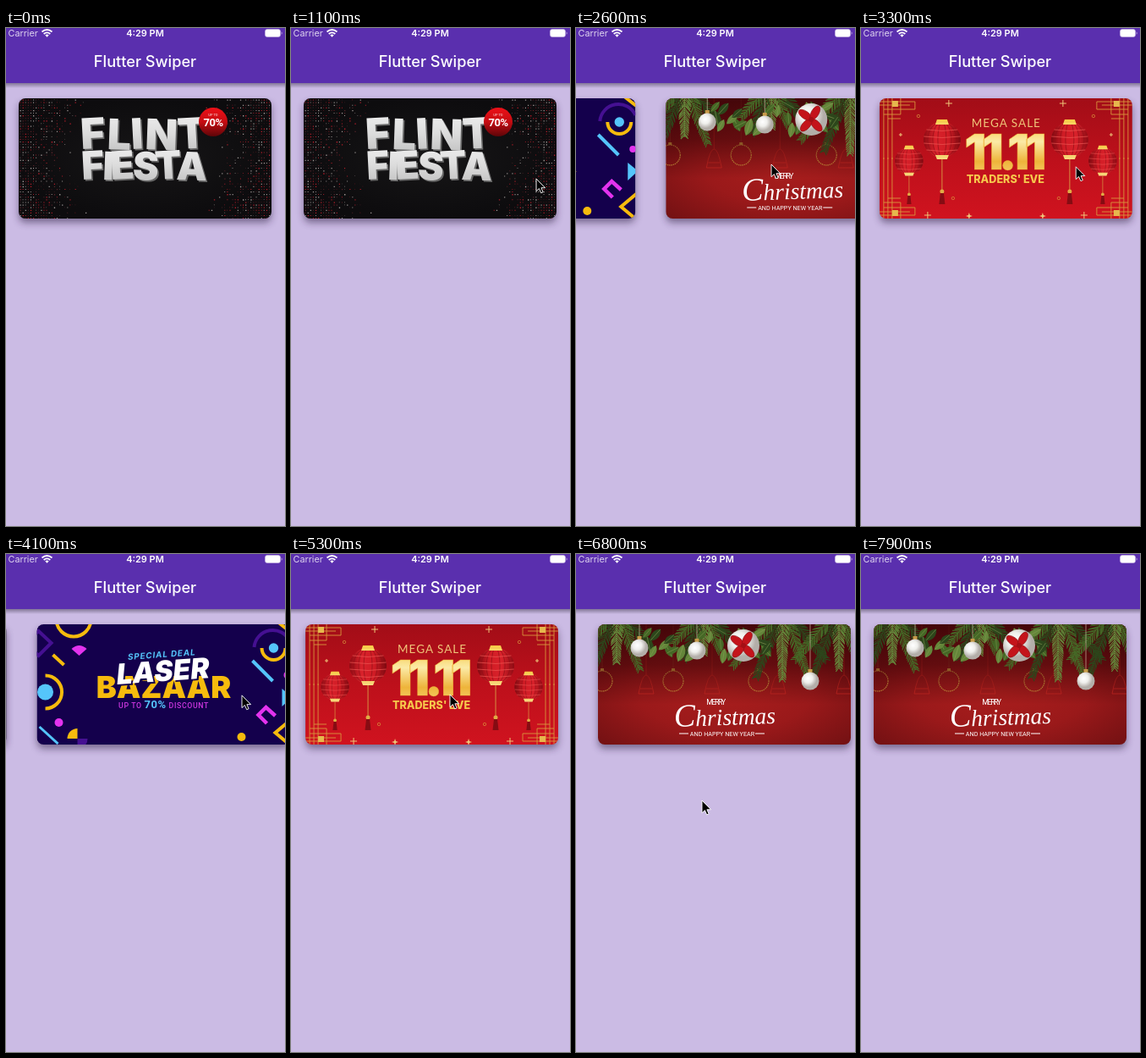
Write an HTML page that moves like this. It is 330x588 px and loops after 8000 ms.

```html
<!DOCTYPE html>
<html lang="en">
<head>
<meta charset="utf-8">
<title>Flutter Swiper</title>
<style>
html, body { margin: 0; width: 100%; height: 100%; overflow: hidden; background: #cbbbe4; }
svg { display: block; width: 100%; height: 100%; font-family: Inter, "Open Sans", sans-serif; }
.mid { text-anchor: middle; }
.line { fill: none; }
.narrow { font-family: Roboto, sans-serif; }
</style>
</head>
<body>
<svg id="stage" viewBox="0 0 330 588" preserveAspectRatio="none"></svg>
<script>
const LOOP = 8000, STEP = 100;
const REST = 15, STRIDE = 335, TOP = 83, W = 299, H = 142;

const swipes = [1185, 2402, 2853, 3305, 3758, 4252, 4746, 5310, 5860, 6396];

// Every swipe pulls the pointer left, then it goes back for the next one.
const dragEnds = swipes.map(t => [t + 150, 215, 159]);
const returns = swipes.slice(0, -1).map(t => [t + 345, 280, 167]);
const stops = [[1000, 322, 186], [1800, 246, 164], [5300, 188, 166], [6800, 149, 291], [7000, 140, 450]];
const pointerPath = [...dragEnds, ...returns, ...stops].sort((a, b) => a[0] - b[0]);

let seed = 7;
const random = () => (seed = seed * 16807 % 2147483647) / 2147483647;
const clamp = v => Math.max(0, Math.min(1, v));
const repeat = (n, make) => Array.from({ length: n }, (_, i) => make(i)).join('');
const circle = (x, y, r, attrs) => `<circle cx="${x}" cy="${y}" r="${r}" ${attrs}/>`;
const path = (d, attrs) => `<path d="${d}" ${attrs}/>`;
const line = (d, color, width) => path(d, `class="line" stroke="${color}" stroke-width="${width}"`);
const backdrop = fill => `<rect width="${W}" height="${H}" fill="${fill}"/>`;
const mirrorX = art => art + `<g transform="translate(${W} 0) scale(-1 1)">${art}</g>`;
const mirrorY = art => art + `<g transform="translate(0 ${H}) scale(1 -1)">${art}</g>`;
const colorStops = colors => colors.map((c, i) => `<stop offset="${i / (colors.length - 1)}" stop-color="${c}"/>`).join('');
const linear = (id, colors, end = 'x2="0" y2="1"') => `<linearGradient id="${id}" ${end}>${colorStops(colors)}</linearGradient>`;
const radial = (id, colors, attrs = '') => `<radialGradient id="${id}" ${attrs}>${colorStops(colors)}</radialGradient>`;

const defs = `<defs>
  <clipPath id="card"><rect width="${W}" height="${H}" rx="8"/></clipPath>
  <filter id="soft" x="-10%" y="-20%" width="120%" height="140%"><feGaussianBlur stdDeviation="4"/></filter>
  ${linear('barShadow', ['#4a425a90', '#4a425a00'])}
  ${linear('stone', ['#f3f3f3', '#dcdcdc', '#b9b9b9'])}
  ${linear('badge', ['#ed1018', '#c50c12', '#5d0508'])}
  ${linear('gold', ['#f6c840', '#fbeaa6', '#eeb43a', '#f8dc82'])}
  ${linear('festive', ['#a20d17', '#bd101b', '#d0131f'])}
  ${linear('lantern', ['#8d0b13', '#d9222b', '#d01c25', '#7d0910'], '')}
  ${linear('shade', ['#2a0004b0', '#2a000480', '#2a000400', '#2a000400'])}
  ${radial('velvet', ['#aa1e1d', '#9a191a', '#6f1012'], 'cy=".55" r=".7"')}
  ${radial('night', ['#171617', '#0d0c0e'])}
  ${radial('pearl', ['#ffffff', '#efefec', '#b3aea9'], 'cx=".38" cy=".35"')}
</defs>`;

function halftone() {
  const colors = ['#9a9391', '#b01c28', '#522328'], dots = ['', '', ''];
  for (let y = 1.5; y < H; y += 3.1) {
    for (let x = 1.5; x < W; x += 3.1) {
      const side = Math.abs(x - 150) / 150, edge = Math.abs(y - 71) / 71;
      if (random() > clamp((side + edge * .16 - .6) * 2.2)) continue;
      const size = (.5 + random() * .9).toFixed(1);
      dots[Math.floor(random() * 3)] += `M${x.toFixed(1)} ${y.toFixed(1)}h${size}v${size}h-${size}z`;
    }
  }
  return dots.map((d, i) => path(d, `fill="${colors[i]}"`)).join('');
}

function blockWord(word, x, y, size, spacing) {
  const turns = [...word].map((_, i) => i % 2 ? 2 : -3).join(' ');
  const text = (shift, fill) => `<text x="${x + shift}" y="${y + shift}" rotate="${turns}" fill="${fill}">${word}</text>`;
  return `<g font-size="${size}" font-weight="900" letter-spacing="${spacing}">${text(1.7, '#686868')}${text(0, 'url(#stone)')}</g>`;
}

function stoneCard() {
  return backdrop('url(#night)') + halftone()
    + blockWord('FLINT', 74, 60, 50, 1)
    + blockWord('FIESTA', 75, 96, 46, -3)
    + circle(230, 28, 17, 'fill="url(#badge)"')
    + `<g class="mid narrow" fill="#fff" font-weight="700">
      <text x="230" y="21" font-size="4" fill="#f0a9a9">UP TO</text>
      <text x="230" y="33" font-size="13" letter-spacing="-.5">70%</text></g>`;
}

function neonCard() {
  const navy = '#14004c', cyan = '#55c5fb', yellow = '#f6bb0d', pink = '#e333ee', violet = '#451092';
  const shapes = [
    line('M2 8L17 22 2 37-13 22Z', violet, 4),
    line('M23 -6A20.5 20.5 0 0 0 64 -6M19 36L32 48M10 60.5A19.5 19.5 0 0 1 10 99.5', yellow, 4),
    path('M50 37L41 29Q50 21 59 29Z', `fill="${pink}"`),
    circle(10, 80, 9.5, `fill="${cyan}"`),
    circle(26, 116, 5, `fill="${pink}"`),
    line('M3 121L25 141', cyan, 3),
    path('M48 135H36A12 12 0 0 1 48 123Z', `fill="${yellow}"`),
    path('M48 135H60A12 12 0 0 1 48 147Z', `fill="${violet}"`),
    line('M257 27A22 22 0 0 1 299 20', violet, 4),
    line('M266 28A14 14 0 0 0 294 28M286 -2L300 9', yellow, 4),
    circle(280, 28, 5.7, `fill="${cyan}"`),
    line('M255 43L279 67', cyan, 4),
    circle(296, 60, 4, `fill="${pink}"`),
    path('M290 76L302 86 290 97Z', `fill="${cyan}"`),
    line('M272 117L262 107 271 98 282 108', pink, 4.5),
    line('M300 113L315 128 300 143 282 128Z', yellow, 4),
    circle(242, 133, 5, `fill="${yellow}"`)
  ];
  const slanted = (shift, fill) => `<text x="${149 + shift}" y="${67 + shift}" font-size="33.5" font-weight="900" fill="${fill}">LASER</text>`;
  return backdrop(navy) + shapes.join('') + `<g class="mid">
    <text x="150" y="87" font-size="36" font-weight="900" fill="${yellow}">BAZAAR</text>
    <g transform="rotate(-4 150 55)" font-style="italic">${slanted(2, navy)}${slanted(0, '#fff')}
      <text x="149" y="39" font-size="9.8" font-weight="700" letter-spacing=".9" fill="${cyan}">SPECIAL DEAL</text></g>
    <text class="narrow" x="150" y="99" font-size="8.8" font-weight="500" letter-spacing=".6" fill="#cb36df">UP TO
      <tspan font-size="13" font-weight="700" fill="${cyan}">70%</tspan> DISCOUNT</text></g>`;
}

const greens = ['#2c461b', '#456826', '#64863a'];

function pine(x, y, degrees, length, color) {
  const angle = degrees * Math.PI / 180;
  const along = (a, r) => `${(Math.cos(a) * r).toFixed(1)} ${(Math.sin(a) * r).toFixed(1)}`;
  let needles = `M${x} ${y}l${along(angle, length)}`;
  for (let s = 4; s < length; s += 2.5) {
    for (const side of [-1, 1]) {
      const reach = 13 - 7 * s / length;
      needles += `M${x} ${y}m${along(angle, s)}l${along(angle + side * (.6 + random() * .2), reach)}`;
    }
  }
  return line(needles, color, 1.1);
}

const fan = (x, length) => repeat(5, i => {
  const lean = i - 2;
  return pine(x - lean * 5, -8, 90 + lean * 20, length * (1.05 - random() * .3), greens[i % 3]);
});

function leaf(i) {
  const x = 58 + i * 5.4, y = 2 + random() * 28, turn = 15 + random() * 140;
  return `<g transform="translate(${x.toFixed(1)} ${y.toFixed(1)}) rotate(${turn.toFixed()}) scale(${(.65 + random() * .3).toFixed(2)})">
    ${path('M0 0Q11 -11 23 0 11 10 0 0Z', `fill="${greens[i % 3]}"`)}${line('M1 0H21', '#8c9f58', .6)}</g>`;
}

function gift(x, y) {
  const loops = repeat(4, i => `<ellipse cx="9" rx="9" ry="4.5" transform="rotate(${48 + i * 84})" fill="#c4141b" stroke="#8d0d12" stroke-width=".6"/>`);
  return circle(x, y, 19, 'fill="url(#pearl)"') + `<g transform="translate(${x} ${y})">${loops}${circle(0, 0, 3, 'fill="#a50f15"')}</g>`;
}

function holidayCard() {
  const ring = x => line(`M${x} 0V53`, '#a5482c', .6)
    + circle(x, 67, 12, 'class="line" stroke="#d39a3e" stroke-width="1.2" stroke-dasharray="1.5 .8"')
    + `<rect x="${x - 2}" y="52" width="4" height="3" fill="#d39a3e"/>`;
  const bell = x => line(`M${x} 0V60M${x - 9} 82Q${x - 5} 60 ${x} 60T${x + 9} 82ZM${x - 7} 76H${x + 7}`, '#c92722', .9);
  const ball = (x, y) => line(`M${x} 0V${y - 10}`, '#ddd3b5', .6)
    + `<rect x="${x - 2.5}" y="${y - 14}" width="5" height="5" fill="#c69a48"/>` + circle(x, y, 10.5, 'fill="url(#pearl)"');
  return backdrop('url(#velvet)')
    + ring(5) + ring(89) + ring(190) + repeat(4, i => bell(57 + 78 * i))
    + backdrop('url(#shade)')
    + fan(22, 66) + fan(125, 50) + fan(218, 78) + fan(285, 70)
    + repeat(28, leaf)
    + ball(49, 28) + ball(117, 31) + ball(251, 67) + gift(172, 25)
    + `<g class="mid" fill="#fff">
      <text class="narrow" x="139" y="95" font-size="9" letter-spacing="-1.6">MERRY</text>
      <text x="150" y="119" font-size="27.5" font-style="italic" font-family="Liberation Serif, serif" transform="rotate(-2 150 112)"><tspan font-size="38">C</tspan>hristmas</text>
      <text class="narrow" x="147" y="132" font-size="7.2">AND HAPPY NEW YEAR</text></g>`
    + line('M96 129H107M186 129H197', '#fff', 1);
}

function lantern(x, y, size, drop) {
  const ribs = repeat(3, i => `<ellipse rx="${5 + 6 * i}" ry="21"/>`);
  const hoops = repeat(4, i => {
    const h = 8 * i - 12, w = Math.sqrt(484 - h * h);
    return `M${-w} ${h}Q0 ${h + 3} ${w} ${h}`;
  });
  return `<g transform="translate(${x} ${y}) scale(${size})">
    <ellipse rx="22" ry="21" fill="url(#lantern)"/>
    <g class="line" stroke="#8e1018" stroke-width=".7">${ribs}</g>
    ${line(hoops, '#ee5854', .7)}
    ${path('M-8 -18L-6 -24H6L8 -18ZM-8 18L-6 23H6L8 18Z', 'fill="url(#gold)"')}
    ${line(`M0 23V${drop}`, '#d99f46', .9)}
    ${circle(0, drop, 2.5, 'fill="#e0ac45"')}
    ${path(`M-2 ${drop + 2}H2L3.5 ${drop + 15}H-3.5Z`, 'fill="#860c13"')}</g>`;
}

function lanternCard() {
  const cream = '#efc579', bronze = '#d9963d';
  const corner = line('M5 0V72M10 0V72M15 0V72M0 4H42V13H5M0 8H36M5 19H25V0M10 24H25', bronze, .9)
    + '<rect x="15" y="3" width="7" height="7" fill="#e6b84d"/>';
  const half = mirrorY(corner)
    + line('M78 6h8M82 2v8M53 138h8M57 134v8M23 43h4M25 41v4', cream, 1)
    + path('M106 135l1 3 3 1-3 1-1 3-1-3-3-1 3-1z', `fill="${cream}"`)
    + circle(46, 21, 1.7, `class="line" stroke="${bronze}" stroke-width=".7"`)
    + circle(87, 118, 1.7, `class="line" stroke="${bronze}" stroke-width=".7"`)
    + lantern(74, 49, 1, 61) + lantern(35, 74, .76, 52);
  return backdrop('url(#festive)') + mirrorX(half) + `<g class="mid">
    <text x="150" y="34" font-size="13.5" letter-spacing="1" font-family="Lato, sans-serif" fill="${cream}">MEGA SALE</text>
    <text x="149" y="100" font-size="12.6" font-weight="800" fill="#f6c84c">TRADERS' EVE</text>
    <text x="146" y="84" font-size="58" font-weight="900" letter-spacing="-6" fill="url(#gold)" stroke="#eeb137" stroke-width=".6">11.11</text></g>`;
}

const cardArt = [stoneCard, neonCard, holidayCard, lanternCard];
const stage = document.getElementById('stage');
stage.innerHTML = defs + `<rect width="330" height="588" fill="#cbbbe4"/>`
  + cardArt.map(draw => `<g class="slide">
    <rect y="5" width="${W}" height="${H}" rx="8" fill="#2b1b40" opacity=".5" filter="url(#soft)"/>
    <g clip-path="url(#card)">${draw()}</g></g>`).join('')
  + `<rect y="65" width="330" height="6" fill="url(#barShadow)"/>
  <rect width="330" height="65" fill="#5a2fae"/>
  <text class="mid" x="164.5" y="46" font-size="18.2" font-weight="500" fill="#fff">Flutter Swiper</text>
  <text x="2.5" y="10" font-size="10.8" fill="#ddd2ef">Carrier</text>
  <text class="mid" x="164.5" y="10" font-size="11" font-weight="600" fill="#fff">4:29 PM</text>
  ${line('M42.5 4.5Q48.5 -.5 54.5 4.5M44.7 7Q48.5 3.7 52.3 7', '#fff', 1.8)}
  ${path('M46.3 8.5Q48.5 6.7 50.7 8.5L48.5 10.8Z', 'fill="#fff"')}
  <rect x="306.5" y="1.5" width="18" height="9" rx="2.5" fill="#fff" stroke="#c9b9e5" stroke-width=".6"/>
  ${path('M325.7 4.2Q327.6 6 325.7 7.8Z', 'fill="#c9b9e5"')}
  <g id="pointer">${path('M0 0V16L3.7 12.6 6.2 18.3 8.8 17.2 6.4 11.7H11.5Z', 'fill="#000" stroke="#fff" transform="scale(.92)"')}</g>`;

const slides = [...stage.querySelectorAll('.slide')];
const pointer = document.getElementById('pointer');

// Critically damped spring towards the next page.
function progress(ms) {
  const u = Math.max(0, ms) * .013;
  return 1 - (1 + u) * Math.exp(-u);
}

function pointerAt(t) {
  const next = pointerPath.findIndex(p => p[0] > t);
  if (next < 1) return null;
  const [t0, x0, y0] = pointerPath[next - 1], [t1, x1, y1] = pointerPath[next];
  const k = (t - t0) / (t1 - t0);
  return [x0 + (x1 - x0) * k, y0 + (y1 - y0) * k];
}

function render(t) {
  const page = swipes.reduce((sum, start) => sum + progress(t - start), 0);
  slides.forEach((slide, i) => {
    let offset = (((i - page) % 4) + 4) % 4;
    if (offset > 2) offset -= 4;
    slide.setAttribute('transform', `translate(${(REST + STRIDE * offset).toFixed(2)} ${TOP})`);
  });
  const spot = pointerAt(t);
  pointer.setAttribute('visibility', spot ? 'visible' : 'hidden');
  if (spot) pointer.setAttribute('transform', `translate(${spot[0]} ${spot[1]})`);
}

const origin = performance.now();
function tick() {
  const t = (performance.now() - origin) % LOOP;
  render(Math.floor(t / STEP) * STEP);
  requestAnimationFrame(tick);
}
tick();
</script>
</body>
</html>
```
